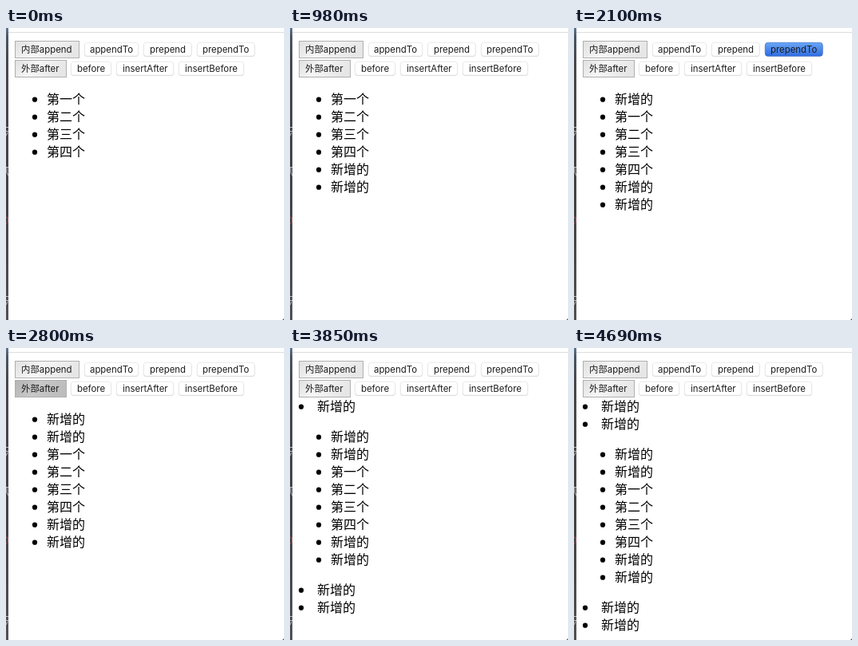
Animation, 348 px wide and 366 px high, one loop 4900 ms. Source, as an HTML page:

```html
<!DOCTYPE html>
<html lang="zh-CN">
<head>
<meta charset="utf-8">
<title>append / after</title>
<style>
html, body { margin: 0; width: 100%; height: 100%; overflow: hidden; background: #fff; }
svg { display: block; width: 348px; height: 366px; }
.item { font: 16px "Noto Sans CJK SC", "Noto Sans CJK", sans-serif; fill: #000; }
.label { font: 11.4px Inter, "Noto Sans CJK SC", "Noto Sans CJK", sans-serif; fill: #1c1c1c; }
</style>
</head>
<body>
<svg id="stage" viewBox="0 0 348 366" xmlns="http://www.w3.org/2000/svg">
  <defs>
    <linearGradient id="edge" x2="0" y2="1">
      <stop offset="0" stop-color="#5d7a98"/>
      <stop offset=".03" stop-color="#4a5664"/>
      <stop offset=".12" stop-color="#48474c"/>
      <stop offset=".6" stop-color="#434247"/>
      <stop offset="1" stop-color="#515055"/>
    </linearGradient>
    <linearGradient id="bevel" x2="1" y2=".25">
      <stop offset="0" stop-color="#e0e0e0"/>
      <stop offset=".45" stop-color="#f6f6f6"/>
      <stop offset="1" stop-color="#e6e6e6"/>
    </linearGradient>
    <linearGradient id="bevelDown" x2="1" y2=".25">
      <stop offset="0" stop-color="#b4b4b4"/>
      <stop offset=".5" stop-color="#c8c8c8"/>
      <stop offset="1" stop-color="#bdbdbd"/>
    </linearGradient>
    <linearGradient id="blue" x2="0" y2="1">
      <stop offset="0" stop-color="#69a6f6"/>
      <stop offset="1" stop-color="#2f6de2"/>
    </linearGradient>
  </defs>
  <rect width="348" height="366" fill="#fff"/>
  <path d="M3 5.5H348" stroke="#dedede"/>
  <rect width="3" height="366" fill="url(#edge)"/>
  <g fill="none" stroke="#c9c9cc" stroke-width=".9">
    <path d="M0 124.5H3M0 129.5H3M0 135L2 131M0 174.5H3M1 175V181L3 185M0 336.5H3M0 341.5H3M0 347L2 343"/>
    <path d="M0 237.5H2.5V243L0 246" stroke="#a04c5a"/>
  </g>
  <path d="M346 366L348 364V366Z" fill="#555"/>
  <g id="buttons"></g>
  <g id="items"></g>
</svg>
<script>
const LOOP = 4900, LINE = 22;
const NS = "http://www.w3.org/2000/svg";
const NEW = "新增的";
const BASE = ["第一个", "第二个", "第三个", "第四个"];

// down / up: when the button is pressed and released
const buttons = [
  { text: "内部append", x: 11, w: 81, row: 0, tx: 19, square: true, add: "append", down: 350, up: 490 },
  { text: "appendTo", x: 98, w: 68, row: 0, tx: 105, add: "append", down: 910, up: 980 },
  { text: "prepend", x: 172, w: 60.5, row: 0, tx: 180, add: "prepend", down: 1610, up: 1680 },
  { text: "prependTo", x: 239, w: 72.5, row: 0, tx: 246, add: "prepend", down: 2100, up: 2170 },
  { text: "外部after", x: 11, w: 65, row: 1, tx: 19, square: true, add: "after", down: 2800, up: 2870 },
  { text: "before", x: 81, w: 51, row: 1, tx: 89, add: "before", down: 3220, up: 3360 },
  { text: "insertAfter", x: 138, w: 72, row: 1, tx: 146, add: "after", down: 3780, up: 3850 },
  { text: "insertBefore", x: 216, w: 82, row: 1, tx: 224, add: "before", down: 4550, up: 4690 }
];

function el(parent, tag, attrs, text) {
  const node = document.createElementNS(NS, tag);
  for (const key in attrs) node.setAttribute(key, attrs[key]);
  if (text) node.textContent = text;
  parent.appendChild(node);
  return node;
}

const buttonLayer = document.getElementById("buttons");
const itemLayer = document.getElementById("items");

for (const b of buttons) {
  const top = 16 + b.row * 24;
  if (b.square) {
    b.face = el(buttonLayer, "rect", { x: b.x + .5, y: top + .5, width: b.w - 1, height: 21, stroke: "#b0b0b0" });
  } else {
    el(buttonLayer, "rect", { x: b.x, y: top + 3, width: b.w, height: 17, rx: 4, fill: "#d2d2d2" });
    b.face = el(buttonLayer, "rect", { x: b.x + .25, y: top + 2.25, width: b.w - .5, height: 17, rx: 3.5, "stroke-width": .6 });
  }
  el(buttonLayer, "text", { x: b.tx, y: top + 15, class: "label" }, b.text);
}

function paint(b, pressed) {
  if (b.square) {
    b.face.setAttribute("fill", pressed ? "url(#bevelDown)" : "url(#bevel)");
  } else {
    b.face.setAttribute("fill", pressed ? "url(#blue)" : "#fff");
    b.face.setAttribute("stroke", pressed ? "#2d63c4" : "#dcdcdc");
  }
}

function drawItem(text, y, inner) {
  el(itemLayer, "circle", { cx: inner ? 36 : 14, cy: y + .7, r: 3.1 });
  el(itemLayer, "text", { x: inner ? 51 : 34, y: y + 6, class: "item" }, text);
}

function drawList(done) {
  const count = kind => done.filter(b => b.add === kind).length;
  const fresh = kind => Array(count(kind)).fill(NEW);
  const list = [...fresh("prepend"), ...BASE, ...fresh("append")];
  itemLayer.replaceChildren();
  let y = 73;
  for (const text of fresh("before")) { drawItem(text, y, false); y += LINE; }
  y += 16;
  for (const text of list) { drawItem(text, y, true); y += LINE; }
  y += 16;
  for (const text of fresh("after")) { drawItem(text, y, false); y += LINE; }
}

let shown = -1;
function render(t) {
  for (const b of buttons) paint(b, t >= b.down && t < b.up);
  const done = buttons.filter(b => t >= b.up);
  if (done.length !== shown) {
    shown = done.length;
    drawList(done);
  }
}

const start = performance.now();
function tick() {
  render((performance.now() - start) % LOOP);
  requestAnimationFrame(tick);
}
tick();
</script>
</body>
</html>
```
